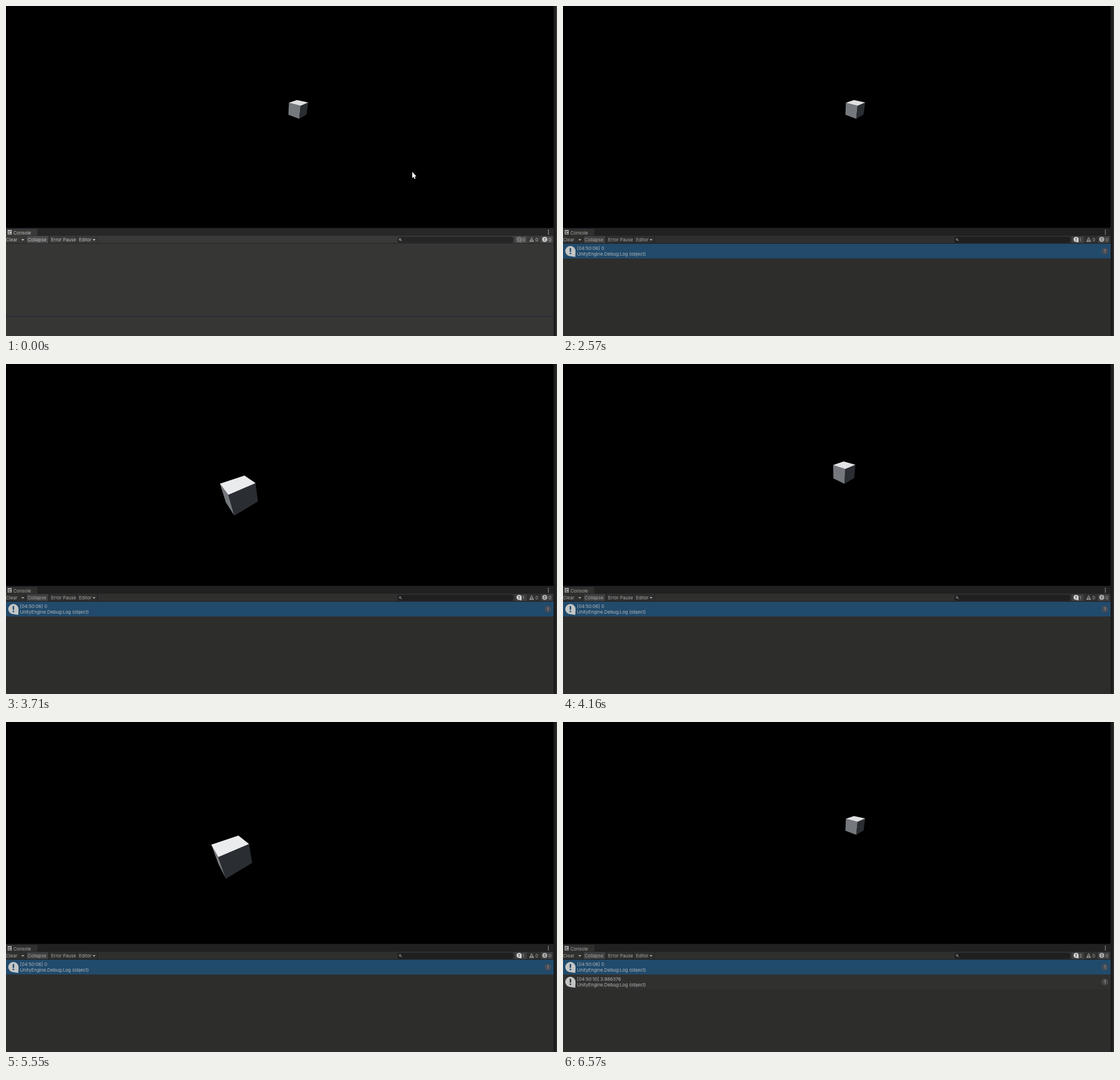
An HTML page with a canvas for the animation above (7.39 s loop, 967 by 579 pixels).

```html
<!DOCTYPE html>
<html lang="en">
<head>
<meta charset="utf-8">
<title>Cube and console</title>
<style>
  html, body { margin: 0; width: 100%; height: 100%; overflow: hidden; background: #000; }
  canvas { display: block; }
</style>
</head>
<body>
<canvas id="stage" width="967" height="579"></canvas>
<script>
const ctx = document.getElementById('stage').getContext('2d');
const LOOP = 7390, PLAY = 1180, FIRST_LOG = 2570, SECOND_LOG = 6570;

function rect(x, y, w, h, color) {
  ctx.fillStyle = color;
  ctx.fillRect(x, y, w, h);
}

function poly(points, color) {
  ctx.fillStyle = color;
  ctx.beginPath();
  for (const [x, y] of points) ctx.lineTo(x, y);
  ctx.closePath();
  ctx.fill();
}

function disc(x, y, r, color) {
  ctx.fillStyle = color;
  ctx.beginPath();
  ctx.arc(x, y, r, 0, 7);
  ctx.fill();
}

function text(str, x, y, color, align = 'left') {
  ctx.font = '8px Inter, sans-serif';
  ctx.textAlign = align;
  ctx.fillStyle = color;
  ctx.fillText(str, x, y);
}

const mix = (a, b, k) => a + (b - a) * k;
const span = (t, a, b) => Math.min(1, Math.max(0, (t - a) / (b - a)));

// Homogeneous vectors: a cube corner and its three edges toward their vanishing points.
const CORNER = [517, 175, 1];
const LEFT = [307, 120, 1].map(v => v * .108);
const RIGHT = [645, 120, 1].map(v => v * .116);
const DOWN = [480, 540, 1].map(v => v * .067);

// The cube slides along its right edge toward the viewer and back, twice.
const TURNS = [2570, 3460, 4515, 5360, 6430];
const REACH = 4.95;

function slide(t) {
  for (let i = 0; i < 4; i++) {
    if (t >= TURNS[i] && t < TURNS[i + 1]) {
      const wave = (1 - Math.cos(Math.PI * span(t, TURNS[i], TURNS[i + 1]))) / 2;
      return REACH * (i % 2 ? 1 - wave : wave);
    }
  }
  return 0;
}

function drawCube(t) {
  const s = slide(t);
  const at = (l, r, d) => {
    const [x, y, w] = CORNER.map((v, i) => v + l * LEFT[i] + (r - s) * RIGHT[i] + d * DOWN[i]);
    return [x / w, y / w];
  };
  const shine = Math.round(mix(221, 235, s / REACH));
  poly([at(0, 0, 0), at(1, 0, 0), at(1, 0, 1), at(0, 0, 1)], '#75787c');
  poly([at(0, 0, 0), at(0, 1, 0), at(0, 1, 1), at(0, 0, 1)], '#2a2d32');
  poly([at(0, 0, 0), at(1, 0, 0), at(1, 1, 0), at(0, 1, 0)], `rgb(${shine},${shine + 2},${shine + 4})`);
}

function drawCursor(t) {
  if (t >= 370) return;
  const step = Math.floor((t + 1) / 40);
  const a = Math.min(3, step) / 3;
  const b = t < 290 ? 0 : t < 330 ? .5 : 1;
  const x = mix(713, 796, a) + 47 * b, y = mix(291, 140, a) - 85 * b;
  poly([[0, 0], [0, 11], [2.4, 8.8], [4, 12.4], [5.7, 11.6], [4.2, 8.2], [7.2, 8]]
    .map(([dx, dy]) => [x + dx, y + dy]), '#fff');
}

function bubble(x, y, r, color, mark) {
  disc(x, y, r, color);
  poly([[x, y + r], [x + r, y], [x + r * .95, y + r * 1.15]], color);
  rect(x - r * .14, y - r * .6, r * .28, r * .75, mark);
  rect(x - r * .14, y + r * .32, r * .28, r * .28, mark);
}

function dropArrow(x, y, color) {
  poly([[x, y], [x + 5, y], [x + 2.5, y + 3]], color);
}

function drawToolbar(c, logs) {
  rect(0, 389, 961, 1, '#171722');
  rect(0, 390, 961, 13, c.strip);
  rect(0, 391, 55, 12, c.bar);
  rect(0, 403, 961, 14, c.bar);
  rect(0, 416, 961, 1, c.edge);

  rect(3, 393, 7, 8, c.text);
  for (const y of [395, 397, 399]) rect(4, y, y === 397 ? 3 : 5, 1, c.bar);
  text('Console', 13, 400.5, c.text);
  for (const y of [393, 396, 399]) rect(951, y, 1.6, 1.6, c.text);

  rect(36, 404, 38, 12, c.active);
  for (const x of [35, 75, 123, 160]) rect(x, 403, 1, 13, c.edge);
  text('Clear', 0, 413, c.text);
  dropArrow(27, 409, c.text);
  text('Collapse', 38, 413, c.text);
  text('Error Pause', 79, 413, c.text);
  text('Editor', 128, 413, c.text);
  dropArrow(152, 409, c.text);

  ctx.beginPath();
  ctx.roundRect(687.5, 405.5, 202, 9.5, 3);
  ctx.fillStyle = c.field;
  ctx.fill();
  ctx.strokeStyle = c.edge;
  ctx.lineWidth = 1;
  ctx.stroke();
  ctx.strokeStyle = c.text;
  ctx.beginPath();
  ctx.arc(691.5, 409.5, 1.5, 0, 7);
  ctx.moveTo(692.6, 410.6);
  ctx.lineTo(694.5, 412.5);
  ctx.stroke();

  rect(893, 404, 21, 12, c.active);
  rect(939, 404, 20, 12, c.active);
  bubble(900.5, 409.5, 4.5, logs ? '#cfcfcf' : '#777', c.active);
  text(logs, 906, 413, c.text);
  poly([[922.5, 405], [927, 414], [918, 414]], '#858585');
  rect(922, 408, 1, 3, c.bar);
  rect(922, 412, 1, 1, c.bar);
  text('0', 929, 413, c.text);
  disc(945.5, 409.5, 4.5, logs ? '#a8a8a8' : '#c8c8c8');
  rect(945, 407, 1.2, 3.3, c.active);
  rect(945, 411, 1.2, 1.2, c.active);
  text('0', 952, 413, c.text);
}

function drawLog(y, line, color, badge, digit) {
  rect(0, y, 961, 26, color);
  bubble(13, y + 13, 9, '#c4c6c6', color);
  text(line, 24.5, y + 10.5, '#b4b8ba');
  text('UnityEngine.Debug:Log (object)', 24.5, y + 20.8, '#b4b8ba');
  disc(951, y + 13, 6, badge);
  text('1', 951, y + 16, digit, 'center');
}

const EDIT = { body: '#363635', bar: '#393938', strip: '#272727', edge: '#242426',
               active: '#4b4b4b', field: '#252526', text: '#c4c4c4' };
const RUN = { body: '#2d2d2c', bar: '#2f2f2e', strip: '#212121', edge: '#1e1e20',
              active: '#3f3f3f', field: '#1f1f20', text: '#a9a9a9' };

function draw(t) {
  const c = t < PLAY ? EDIT : RUN;
  const logs = t < FIRST_LOG ? 0 : t < SECOND_LOG ? 1 : 2;
  rect(0, 0, 967, 390, '#000');
  drawCube(t);
  drawCursor(t);
  rect(0, 390, 967, 189, c.body);
  drawToolbar(c, logs);
  if (t < PLAY) rect(0, 544, 961, 1, '#242430');
  if (logs > 0) drawLog(417, '[04:50:06] 0', '#214a6b', '#454d58', '#c09a90');
  if (logs > 1) drawLog(443, '[04:50:10] 3.986376', '#30302f', '#484848', '#b0b0b0');
  rect(961, 0, 6, 579, '#1c1c1d');
  rect(965, 0, 2, 579, c.body);
}

function tick(now) {
  draw(now % LOOP);
  requestAnimationFrame(tick);
}
requestAnimationFrame(tick);
</script>
</body>
</html>
```
